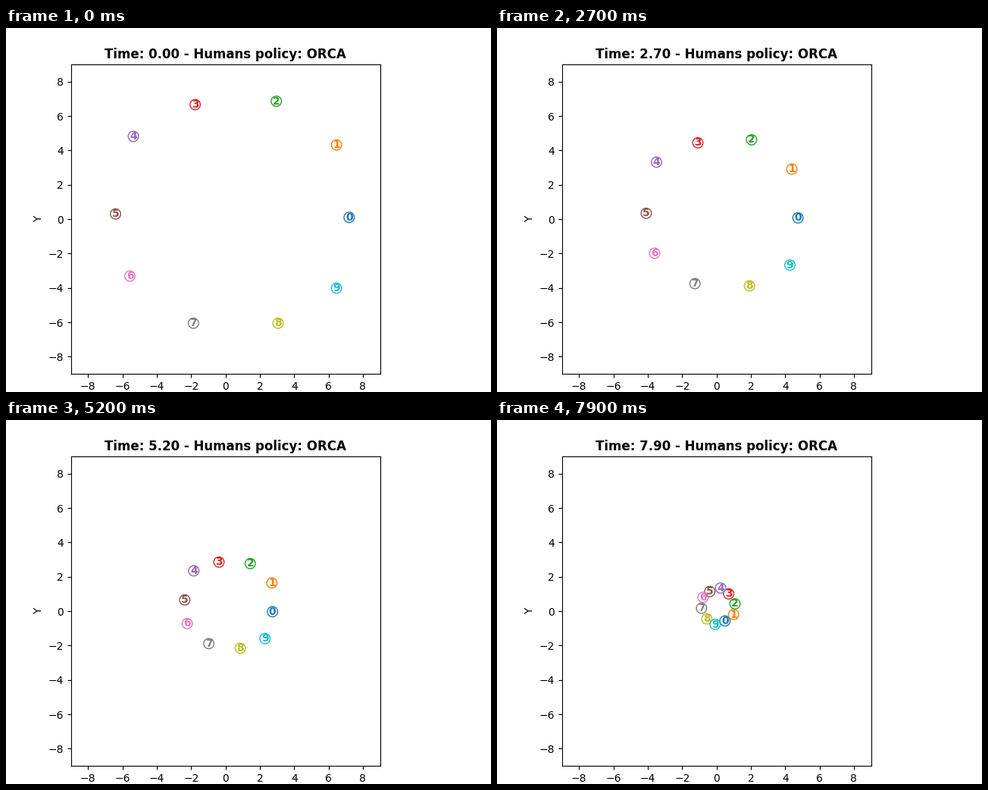
Write a matplotlib script that moves like this. It is 640 px wide and 480 px high and loops after 8000 ms.

```python
import numpy as np
import matplotlib.pyplot as plt
from matplotlib.animation import FuncAnimation

HUMANS = 10
STEP = 0.1        # seconds of simulation per picture
STEPS = 80
RADIUS = 0.3
CRUISE = 1.5      # seconds at full speed before the crowd slows down

# Positions are complex numbers: x + iy.
angles = 2 * np.pi * np.arange(HUMANS) / HUMANS
jitter_x = np.array([2, 8, 8, 4, 3, 6, 1, 3, 9, 8])
jitter_y = np.array([1, 2, 2, 0, 7, 3, 8, 6, 6, 1])
start = 7 * np.exp(1j * angles) + (jitter_x + 1j * jitter_y) / 10
heading = -start / abs(start)
slow_start = start + CRUISE * heading
centre = slow_start.mean()


def positions(t):
    """Straight run to the opposite side, then a ring that shrinks and swirls."""
    if t <= CRUISE:
        return start + t * heading
    ring = np.interp(t, [CRUISE, 6.5, 7.9], [5.5, 1.68, 1.0])
    swirl = np.radians(64 * (ring ** -2 - 5.5 ** -2))
    lift = np.interp(t, [CRUISE, 5.2], [0, 0.23])
    turned = centre + (slow_start - centre) * np.exp(-1j * swirl)
    return turned * ring / 5.5 + 1j * lift


fig, ax = plt.subplots(figsize=(6.4, 4.8), dpi=100)
fig.subplots_adjust(left=0.125, right=0.78, bottom=0.05, top=0.9)
ax.set_aspect("equal")
ax.set(xlim=(-9, 9), ylim=(-9, 9), ylabel="Y")
ax.set_xticks(range(-8, 9, 2))
ax.set_yticks(range(-8, 9, 2))
title = ax.set_title("", fontweight="bold")

circles, labels = [], []
for i in range(HUMANS):
    color = f"C{i}"
    circles.append(ax.add_patch(
        plt.Circle((0, 0), RADIUS, fill=False, edgecolor=color)))
    labels.append(ax.text(0, 0, str(i), color=color, weight="bold",
                          ha="center", va="center"))


def update(n):
    t = n * STEP
    title.set_text(f"Time: {t:.2f} - Humans policy: ORCA")
    for circle, label, p in zip(circles, labels, positions(t)):
        circle.center = p.real, p.imag
        label.set_position((p.real, p.imag))
    return [title, *circles, *labels]


anim = FuncAnimation(fig, update, frames=STEPS, interval=1000 * STEP,
                     repeat=True, repeat_delay=0, blit=False)
plt.show()
```
